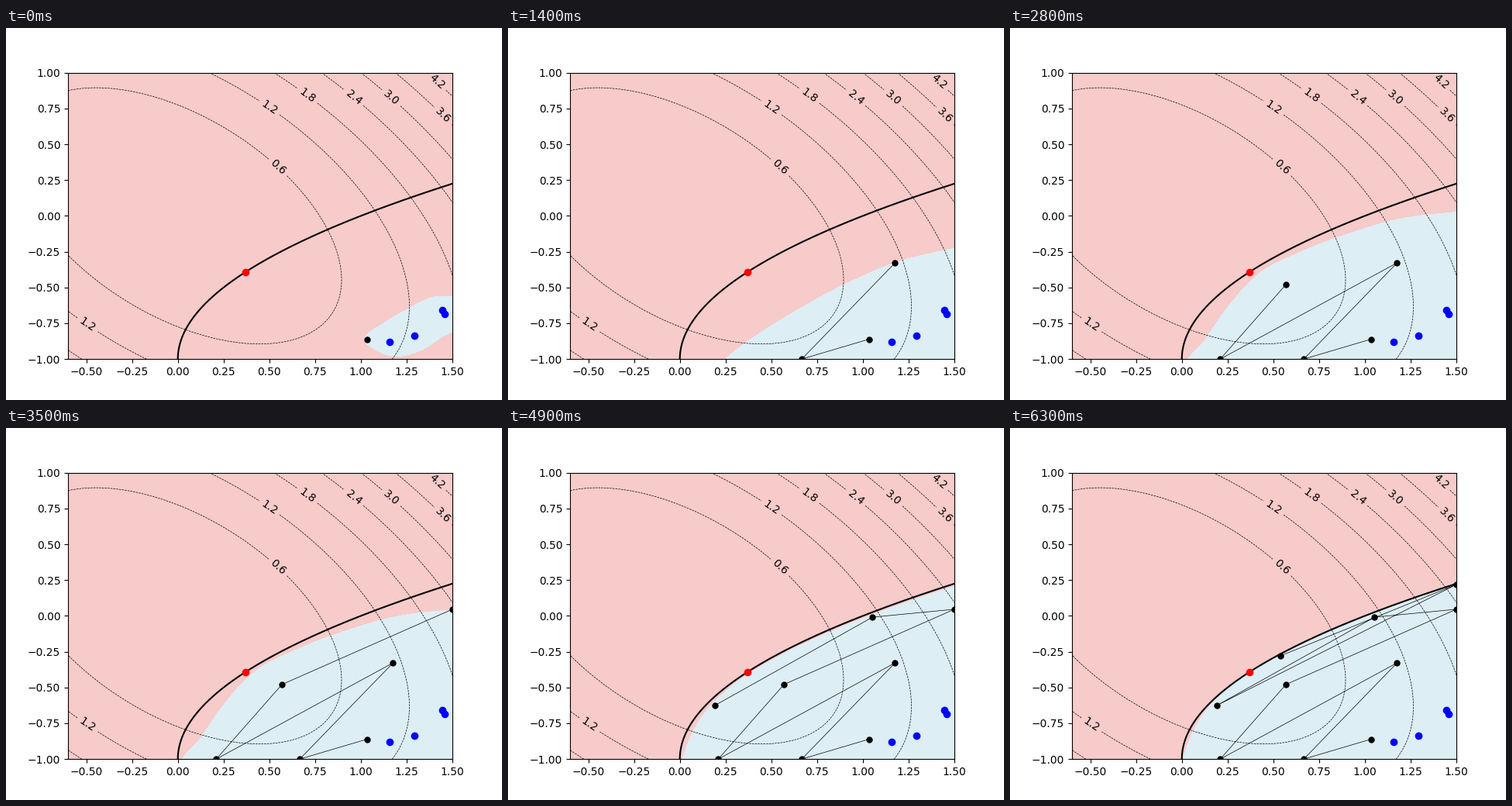
Recreate the animation shown at these times as a matplotlib script. Size 640 px wide and 480 px high, loop 7 s.

```python
import numpy as np
import matplotlib.pyplot as plt
from matplotlib.animation import FuncAnimation

LEFT, RIGHT = -0.6, 1.5
PINK, BLUE = "#f6cbca", "#ddeef4"
UNIT = 184.8  # pixels per unit of y


def to_data(points):
    """Convert stage pixels (y down) to axes data coordinates."""
    x, y = np.array(points, float).T
    return np.column_stack([LEFT + (x - 80) / 496 * (RIGHT - LEFT),
                            (242.4 - y) / UNIT])


def smooth(points, steps=12):
    """Catmull-Rom curve through the points."""
    p = np.vstack([2 * points[0] - points[1], points,
                   2 * points[-1] - points[-2]])
    t = np.linspace(0, 1, steps, endpoint=False)[:, None]
    parts = []
    for a, b, c, d in zip(p[:-3], p[1:-2], p[2:-1], p[3:]):
        m, n = (c - a) / 2, (d - b) / 2
        parts.append(b + m * t + (3 * (c - b) - 2 * m - n) * t ** 2
                     + (2 * (b - c) + m + n) * t ** 3)
    return np.vstack(parts + [points[-1:]])


def close(line):
    """Close a boundary through a corner outside the axes."""
    return np.vstack([line, [[2, -2]]])


def below_limit(drop):
    """Boundary lying the given pixels below the constraint curve."""
    s, d = smooth(np.column_stack([knots[-len(drop):], drop])).T
    return close(np.column_stack([s ** 2, s - 1 - d / UNIT]))


knots = 0.05 + 0.15 * np.arange(9)
blob = smooth(to_data([
    (578, 346), (548, 348), (518, 363), (490, 379), (463, 400), (480, 417),
    (505, 423.5), (535, 416), (562, 399), (578, 391)]))
bulge = smooth(to_data([
    (578, 298.5), (535, 306), (465, 337), (400, 367), (378, 391), (374, 404),
    (378, 428)]))
wide = np.array([20, 32, 38.5, 22.7, 7, 7.6, 11.4, 18.6, 37])
lifted = np.append(wide[:6], [8.5, 8, 1])
tight = 20 * np.exp(-(knots / 0.3) ** 2) + 0.3
drops = [
    [92, 89, 85, 79, 76.6, 85],
    [87, 81, 64, 41.6, 13, 21.3, 47],
    wide + 3, wide, lifted, 1.2 * tight + 3.2, tight + 1.5, tight,
]
regions = [blob, close(bulge)] + [below_limit(d) for d in drops]

queries = np.array([
    (1.034, -.861), (.666, -1), (1.176, -.328), (.21, -1), (.569, -.479),
    (1.5, .046), (1.053, -.009), (.192, -.625), (1.5, .219), (.539, -.279)])
starts = np.array([(1.159, -.88), (1.2925, -.834), (1.445, -.658),
                   (1.458, -.685)])

fig, ax = plt.subplots(figsize=(6.4, 4.8), dpi=100)
ax.set_xlim(LEFT, RIGHT)
ax.set_ylim(-1, 1)
ax.set_facecolor(PINK)

region, = ax.fill(*regions[0].T, color=BLUE, lw=0, zorder=0.5,
                  antialiased=False)

gx, gy = np.meshgrid(np.linspace(LEFT, RIGHT, 200), np.linspace(-1, 1, 200))
levels = 0.6 * np.arange(1, 8)
cost = ax.contour(gx, gy, gx ** 2 + gx * gy + gy ** 2, levels=levels,
                  colors="black", linewidths=0.5, linestyles="dashed")
label_x = np.array([.547, .501, .708, .962, 1.166, 1.449, 1.415])
label_y = (np.sqrt(4 * levels - 3 * label_x ** 2) - label_x) / 2
ax.clabel(cost, inline=True, fontsize=10, fmt="%.1f",
          manual=list(zip(label_x, label_y)) + [(-.49, -.755)])

y = np.linspace(-1, 0.3, 300)
ax.plot((y + 1) ** 2, y, color="black", lw=1.5)
path, = ax.plot([], [], "o-", color="black", lw=0.5, ms=5)
ax.plot(*starts.T, "o", color="blue", ms=6)
ax.plot([.3685], [-.393], "o", color="red", ms=6)


def update(i):
    region.set_xy(regions[i])
    path.set_data(*queries[:i + 1].T)
    return region, path


anim = FuncAnimation(fig, update, frames=len(queries), interval=700,
                     repeat=True, repeat_delay=0)
plt.show()
```
